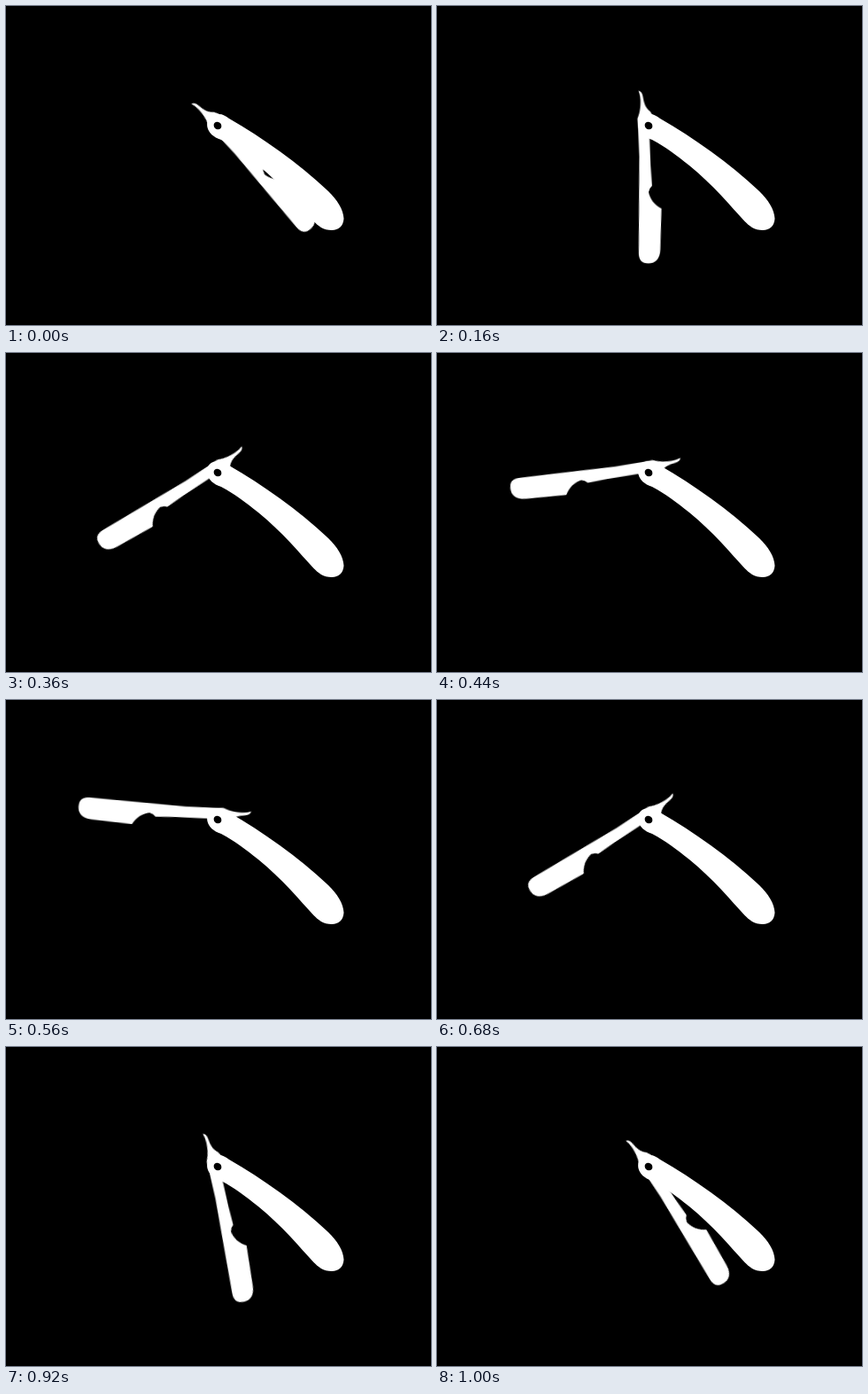
An HTML page that plays this animation: 480x360 px, repeating every 1.04 s.

```html
<!DOCTYPE html>
<html lang="en">
<head>
<meta charset="utf-8">
<title>Folding razor</title>
<style>
  html, body { margin: 0; width: 100%; height: 100%; overflow: hidden; background: #000; }
  svg { display: block; width: 480px; height: 360px; fill: #fff; shape-rendering: geometricPrecision; }

  /* 26 poses of 40 ms: the blade opens over 13 poses and closes the same way */
  .blade {
    transform-origin: 240px 132px;
    animation: swing 1040ms -3ms infinite;
  }
  @keyframes swing {
    0%       { transform: translate(0, 0) rotate(-41.9deg); animation-timing-function: steps(1); }
    3.8462%  { transform: translate(0, 0) rotate(-32.7deg); animation-timing-function: steps(3); }
    15.3846% { transform: translate(-3px, 0) rotate(-1.5deg); animation-timing-function: steps(2); }
    23.0769% { transform: translate(0, 0) rotate(21deg); animation-timing-function: steps(3); }
    34.6154% { transform: translate(0, 0) rotate(57.5deg); animation-timing-function: steps(4); }
    50%      { transform: translate(0, 0) rotate(105.5deg); animation-timing-function: steps(4); }
    65.3846% { transform: translate(0, 0) rotate(57.5deg); animation-timing-function: steps(3); }
    76.9231% { transform: translate(0, 0) rotate(21deg); animation-timing-function: steps(2); }
    84.6154% { transform: translate(-3px, 0) rotate(-1.5deg); animation-timing-function: steps(3); }
    96.1538% { transform: translate(0, 0) rotate(-32.7deg); animation-timing-function: steps(1); }
    100%     { transform: translate(0, 0) rotate(-41.9deg); }
  }
</style>
</head>
<body>
<svg viewBox="0 0 480 360">
  <path class="blade" d="M231.5 95.5 C234 96 236 98 236.5 103 C237.5 110 239 115 244 119
    L247 124 L246 132 L242.5 145 L243 180 L244 203 Q240.5 206 240 210
    C241 217 246 225 254 229 L251.5 275 C251 286 245 290.5 238 290.5
    C230 290.5 227 286 227 279 L228.7 225 L230.5 170 L230 140 L229.5 127
    C233 119 233.5 112 233.5 106 C233.3 101 232.5 98 231.5 95.5 Z"/>
  <path d="M240 122 C245 122 248 124 252 127 C290 149 330 177 364 209
    C374 219 381 229 381.5 240 C381 248 376 253 368 253
    C358 253 352.5 248 347.5 243 C330 224 313 203 285 180
    C270 168 258 159 243 151 C234 148 229 143 227.5 137
    C226 130 229 122 240 122 Z"/>
  <ellipse cx="239" cy="135" rx="4.6" ry="4.1" transform="rotate(45 239 135)" fill="#000"/>
</svg>
</body>
</html>
```
